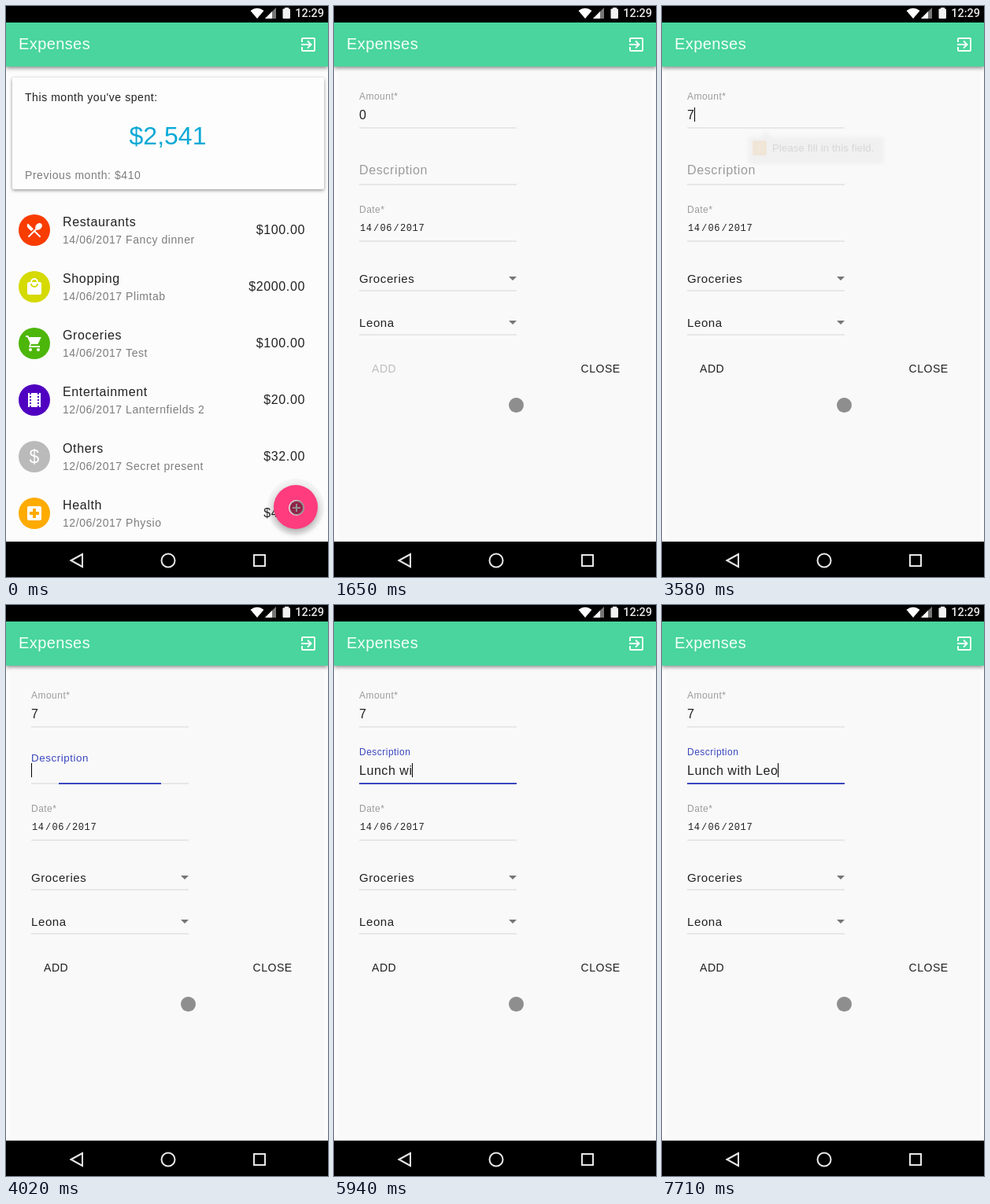
Recreate the animation shown at these times as an HTML page with a canvas. Size 409 by 726 pixels, loop 8 s.

```html
<!DOCTYPE html>
<html lang="en">
<head>
<meta charset="utf-8">
<title>Expenses</title>
<style>
  html, body { margin: 0; width: 100%; height: 100%; overflow: hidden; background: #fcfcfc; }
  canvas { display: block; }
</style>
</head>
<body>
<canvas id="stage" width="409" height="726"></canvas>
<script>
const ctx = document.getElementById('stage').getContext('2d');
const LOOP = 8000;
const SANS = '"Liberation Sans", Arial, sans-serif';
const MONO = '"Liberation Mono", monospace';
const INK = '#212121', MUTED = '#7d7d7d', HINT = '#9c9c9c', BLUE = '#3b47bf';

// Each step overrides part of the state from its time on.
const steps = [
  [0, { screen: 'list', amount: '0', desc: '', focus: 'amount', caret: true,
        lift: 0, tip: 0, travel: 0, cursor: 'touch' }],
  [1050, { screen: 'form' }],
  [1350, { travel: 0.3 }],
  [1500, { travel: 0.85, caret: false }],
  [1650, { travel: 1 }],
  [1940, { caret: true }],
  [2540, { caret: false }],
  [2990, { caret: true }],
  [3430, { amount: '', tip: 1 }],
  [3580, { amount: '7', tip: 0.12 }],
  [3730, { tip: 0 }],
  [4020, { focus: 'desc', lift: 0.65 }],
  [4170, { lift: 1 }],
  [4470, { caret: false }],
  [4770, { cursor: 'move' }],
  [4910, { cursor: 'touch', desc: 'L', caret: true }],
  [5210, { desc: 'Lu' }],
  [5360, { desc: 'Lunc' }],
  [5500, { desc: 'Lunch ' }],
  [5790, { desc: 'Lunch w' }],
  [5940, { desc: 'Lunch wi' }],
  [6080, { desc: 'Lunch with' }],
  [6230, { desc: 'Lunch with ' }],
  [6370, { cursor: 'move' }],
  [6520, { cursor: 'touch', desc: 'Lunch with Le' }],
  [6660, { desc: 'Lunch with Leo' }],
  [7260, { caret: false }],
  [7710, { caret: true }],
];

const filmHoles = [3, 7, 11, 15, 19].map(y => `M6 ${y}h2v2h-2zM16 ${y}h2v2h-2z`).join('');
const icons = {
  cutlery: 'M8.1 13.3l2.8-2.8-7-7c-1.6 1.6-1.6 4.1 0 5.7z' +
    'M14.9 11.5c1.5.7 3.7.2 5.3-1.4 1.9-1.9 2.3-4.7.8-6.1-1.5-1.5-4.2-1.1-6.1.8' +
    '-1.6 1.6-2.1 3.7-1.4 5.3L3.7 19.9l1.4 1.4 6.9-6.9 6.9 6.9 1.4-1.4-6.9-6.9z',
  bag: 'M5 6h14a2 2 0 0 1 2 2v12a2 2 0 0 1-2 2H5a2 2 0 0 1-2-2V8a2 2 0 0 1 2-2z' +
    'M7 6a5 5 0 0 1 10 0h-2a3 3 0 0 0-6 0zM7 8a5 5 0 0 0 10 0h-2a3 3 0 0 1-6 0z',
  cart: 'M5.2 4h15.6l-4.4 9H8.1l-1 2H19v2H5l1.6-5.4L3 4H1V2h3.3z' +
    'M5 20a2 2 0 0 1 4 0a2 2 0 0 1-4 0zM15 20a2 2 0 0 1 4 0a2 2 0 0 1-4 0z',
  film: 'M4 3h16v18H4z' + filmHoles,
  cross: 'M5 3h14a2 2 0 0 1 2 2v14a2 2 0 0 1-2 2H5a2 2 0 0 1-2-2V5a2 2 0 0 1 2-2z' +
    'M10 6v4H6v4h4v4h4v-4h4v-4h-4V6z',
};

const rows = [
  ['Restaurants', '14/06/2017 Fancy dinner', '$100.00', '#f93c00', 'cutlery'],
  ['Shopping', '14/06/2017 Plimtab', '$2000.00', '#d5da00', 'bag'],
  ['Groceries', '14/06/2017 Test', '$100.00', '#4db60a', 'cart'],
  ['Entertainment', '12/06/2017 Lanternfields 2', '$20.00', '#5000c0', 'film'],
  ['Others', '12/06/2017 Secret present', '$32.00', '#bababa', null],
  ['Health', '12/06/2017 Physio', '$40.00', '#ffab00', 'cross'],
];

function text(str, x, y, size, color, { gap = size * 0.04, align = 'left', font = SANS, weight = 400 } = {}) {
  ctx.font = `${weight} ${size}px ${font}`;
  ctx.letterSpacing = gap + 'px';
  ctx.textAlign = align;
  ctx.fillStyle = color;
  ctx.fillText(str, x, y);
  return ctx.measureText(str).width;
}

function rect(x, y, w, h, color) {
  ctx.fillStyle = color;
  ctx.fillRect(x, y, w, h);
}

function roundRect(x, y, w, h, r, color) {
  ctx.beginPath();
  ctx.roundRect(x, y, w, h, r);
  ctx.fillStyle = color;
  ctx.fill();
}

function circle(x, y, r, color) {
  ctx.beginPath();
  ctx.arc(x, y, r, 0, Math.PI * 2);
  ctx.fillStyle = color;
  ctx.fill();
}

function fillPath(d, color) {
  ctx.fillStyle = color;
  ctx.fill(new Path2D(d), 'evenodd');
}

function strokePath(d, color, width) {
  ctx.strokeStyle = color;
  ctx.lineWidth = width;
  ctx.stroke(new Path2D(d));
}

function withShadow(dy, blur, alpha, draw) {
  ctx.save();
  ctx.shadowColor = `rgba(0,0,0,${alpha})`;
  ctx.shadowOffsetY = dy;
  ctx.shadowBlur = blur;
  draw();
  ctx.restore();
}

function drawBars() {
  withShadow(2, 5, 0.45, () => rect(0, 21, 409, 56, '#49d59d'));
  text('Expenses', 16, 55, 20, '#f4fffa', { gap: 0.4 });
  strokePath('M376 46v-4q0-1 1-1h14q1 0 1 1v14q0 1-1 1h-14q-1 0-1-1v-4M375 49h12M383 44.5l4.5 4.5-4.5 4.5', '#f4fffa', 2);

  rect(0, 0, 409, 21, '#000');
  fillPath('M310.5 6Q319 -0.5 327.5 6L319 16z', '#fff');
  fillPath('M343 2v14h-14z', '#777');
  fillPath('M338 7v9h-9z', '#fff');
  rect(354, 2, 5, 2, '#fff');
  roundRect(351.5, 3.5, 9.5, 12.5, 1, '#f2f2f2');
  text('12:29', 404, 14, 14.5, '#e8e8e8', { gap: 0, align: 'right', font: 'Roboto, sans-serif', weight: 500 });

  rect(0, 681, 409, 45, '#000');
  strokePath('M82.5 705L97 697v16z', '#e8e8e8', 2);
  strokePath('M197.5 705a8.5 8.5 0 0 1 17 0a8.5 8.5 0 0 1-17 0z', '#e8e8e8', 2);
  strokePath('M315 698h14v14h-14z', '#e8e8e8', 2);
}

function drawRow([title, note, amount, color, icon], i) {
  const y = 285 + i * 72;
  circle(36, y, 20, color);
  if (icon) {
    ctx.save();
    ctx.translate(24, y - 12);
    fillPath(icons[icon], '#fff');
    ctx.restore();
  } else {
    text('$', 36, y + 8, 23, '#fff', { gap: 0, align: 'center' });
  }
  text(title, 72, y - 5, 16, INK);
  text(note, 72, y + 17, 14, MUTED);
  text(amount, 380, y + 5, 16, INK, { align: 'right' });
}

function drawList() {
  withShadow(1.5, 4, 0.42, () => roundRect(8, 91, 396, 142, 2, '#fdfdfd'));
  text("This month you've spent:", 24, 121, 14, INK);
  text('$2,541', 205.5, 176, 32, '#0aa9d6', { gap: 0, align: 'center' });
  text('Previous month: $410', 24, 220, 14, MUTED);
  rows.forEach(drawRow);

  circle(368, 637, 36, 'rgba(0,0,0,0.03)');
  withShadow(4, 10, 0.32, () => circle(368, 637, 28, '#ff3c7d'));
  strokePath('M360 638a9 9 0 0 1 18 0a9 9 0 0 1-18 0zM364 638h10M369 633v10', '#fff', 2);
}

function drawTip(alpha) {
  ctx.save();
  ctx.globalAlpha = alpha;
  withShadow(2, 5, 0.35, () => {
    roundRect(109, 164, 173, 34, 4, '#fff');
    fillPath('M125 165l7-8 7 8z', '#fff');
  });
  roundRect(115, 171, 18, 19, 2, '#f9a52b');
  rect(123, 174, 2.5, 8, '#fff');
  rect(123, 184, 2.5, 2.5, '#fff');
  text('Please fill in this field.', 140, 185, 13, '#222', { gap: 0.2 });
  ctx.restore();
}

function drawSelect(label, y) {
  text(label, 32, y, 15, INK);
  fillPath(`M222 ${y - 8}h10l-5 5z`, '#757575');
}

function drawForm(s) {
  rect(5, 84, 399, 593, '#f9f9f9');
  for (const y of [155, 227, 299, 362, 418]) rect(32, y - 0.5, 200, 1, '#d6d6d6');

  text('Amount*', 32, 119, 12, HINT);
  text(s.amount, 32, 144, 16, INK);

  const labelColor = s.lift ? BLUE : HINT;
  text('Description', 32, 214 - 23.5 * s.lift, 16 - 4 * s.lift, labelColor);
  rect(132 - 100 * s.lift, 226, 200 * s.lift, 2, BLUE);
  const descWidth = text(s.desc, 32, 216, 16, INK, { gap: 0.55 });

  text('Date*', 32, 263, 12, HINT);
  [['14', 33], ['/', 50], ['06', 58.5], ['/', 75.5], ['2017', 84]]
    .forEach(([part, x]) => text(part, x, 286, 12, INK, { gap: 0.6, font: MONO }));

  drawSelect('Groceries', 352);
  drawSelect('Leona', 408);
  text('ADD', 48, 466, 14, s.amount === '7' ? INK : '#bdbdbd');
  text('CLOSE', 313.5, 466, 14, INK);

  if (s.caret) {
    const amountCaret = { '': 32, '0': 42, '7': 41 }[s.amount];
    if (s.focus === 'amount') rect(amountCaret, 129, 1, 18, '#000');
    else rect(32 + Math.floor(descWidth), 201, 1, 18, '#000');
  }
  if (s.tip) drawTip(s.tip);
}

function drawCursor(s) {
  const x = 369.5 - 138 * s.travel, y = 638 - 130.5 * s.travel;
  if (s.cursor === 'touch') {
    circle(x, y, 9.5, 'rgba(0,0,0,0.43)');
    return;
  }
  ctx.save();
  ctx.translate(231, 507);
  for (let i = 0; i < 4; i++) {
    const arm = 'M-1 0v-3.5h-2.5L0-7.5l3.5 4H1V0z';
    strokePath(arm, '#fff', 1);
    fillPath(arm, '#000');
    ctx.rotate(Math.PI / 2);
  }
  rect(-1, -4, 2, 8, '#000');
  rect(-4, -1, 8, 2, '#000');
  ctx.restore();
}

function render(time) {
  const state = {};
  for (const [start, change] of steps) if (time >= start) Object.assign(state, change);
  rect(0, 0, 409, 726, '#fcfcfc');
  if (state.screen === 'list') drawList();
  else drawForm(state);
  drawBars();
  drawCursor(state);
}

let origin;
function tick(now) {
  origin ??= now;
  render((now - origin) % LOOP);
  requestAnimationFrame(tick);
}
render(0);
requestAnimationFrame(tick);
</script>
</body>
</html>
```
